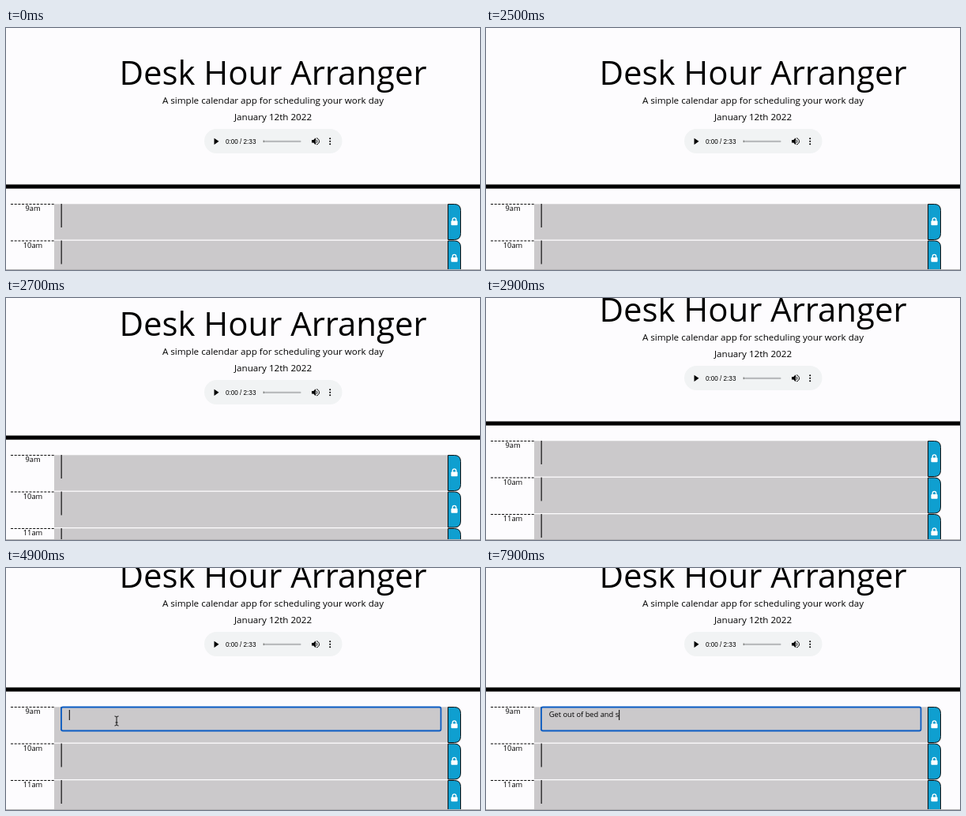
An HTML page for the animation above (8 s loop, 600x307 px).

```html
<!DOCTYPE html>
<html lang="en">
<head>
<meta charset="utf-8">
<title>Desk Hour Arranger</title>
<style>
  html, body { margin: 0; width: 100%; height: 100%; overflow: hidden; background: #fdfcfe; }
  svg { display: block; width: 100vw; height: 100vh; }
  text { font: 9.31px "Open Sans", sans-serif; }
  .mid { text-anchor: middle; }
  .title { font-size: 41.9px; }
  .lead { font-size: 11.64px; }
  .time { font: 8.15px "Liberation Sans", Arial, sans-serif; }
</style>
</head>
<body>
<svg viewBox="0 0 600 307">
  <g id="page">
    <g class="mid">
      <text class="title mid" x="338" y="72">Desk Hour Arranger</text>
      <text class="lead mid" x="338" y="96">A simple calendar app for scheduling your work day</text>
      <text class="lead mid" x="338" y="117">January 12th 2022</text>
    </g>
    <rect x="251" y="128" width="174.5" height="31" rx="15.5" fill="#f1f3f4"/>
    <path d="M263.5 139.7v8.2l6-4.1z"/>
    <text class="time" x="278" y="146.7">0:00 / 2:33</text>
    <rect x="326" y="142.7" width="47.5" height="2.2" rx="1" fill="#b9bbbd"/>
    <rect x="325.6" y="142.5" width="1.2" height="2.6" fill="#777"/>
    <path d="M387 142.1h2.2l2.8-2.8v9l-2.8-2.8H387z"/>
    <path d="M393 141.8q1.7 2 0 4M393 139.7c4.6 1 4.6 7.2 0 8.2" fill="none" stroke="#000"/>
    <path d="M410.2 140.3v0M410.2 143.8v0M410.2 147.3v0" stroke="#000" stroke-width="2.1" stroke-linecap="round"/>
    <rect y="198.5" width="600" height="5.2"/>
    <g id="rows"></g>
    <g id="field">
      <rect x="70" y="223.5" width="480.5" height="30" rx="2" fill="#cbc9cb" stroke="#0b5cc4" stroke-width="1.8"/>
      <text id="note" x="79.8" y="236" xml:space="preserve"></text>
      <rect id="caret" y="227" width="1" height="13"/>
    </g>
  </g>
  <path id="beam" d="M-2.5-6Q0-6 0-4.5Q0-6 2.5-6M0-4.5V4.5M-2.5 6Q0 6 0 4.5Q0 6 2.5 6M-1.5 2h3" fill="none" stroke="#111"/>
  <rect y="306" width="600" height="1" fill="#b4b3b5"/>
</svg>
<script>
const $ = id => document.getElementById(id);
const LOOP = 8000, PHRASE = "Get out of bed and s";
const FOCUS_AT = 4500, TYPE_AT = 5290, KEY_MS = 130;
const scroll = [[2500, 0], [2600, 10], [2700, 24], [2800, 35], [2900, 42], [3000, 45], [3300, 47]];
const mouse = [[3600, 232, 271], [3800, 201, 243], [3900, 201, 243], [4300, 140, 194]];

$("rows").innerHTML = ["9am", "10am", "11am"].map((hour, i) => `
  <g transform="translate(0 ${223 + i * 46.5})">
    <path d="M6 .5H61" stroke="#000" stroke-dasharray="3 1.7"/>
    <text class="mid" x="34" y="9">${hour}</text>
    <rect x="61" y=".3" width="498" height="45.2" fill="#cbc9cb"/>
    <rect x="69.6" width="1.1" height="30"/>
    <path d="M559.5 .5h8q8 0 8 8v29q0 8-8 8h-8z" fill="#0f9fd0" stroke="#111"/>
    <rect x="563.4" y="21.6" width="8.2" height="5.6" rx="1" fill="#fff"/>
    <path d="M565.2 22v-1.8a2.3 2.3 0 0 1 4.6 0V22" fill="none" stroke="#fff" stroke-width="1.3"/>
  </g>`).join("");

// Linear interpolation of column c along keys sorted by time
function along(keys, t, c) {
  const i = keys.findIndex(k => k[0] > t);
  if (i < 0) return keys[keys.length - 1][c];
  if (i === 0) return keys[0][c];
  const a = keys[i - 1], b = keys[i];
  return a[c] + (b[c] - a[c]) * (t - a[0]) / (b[0] - a[0]);
}

function show(el, on) {
  el.style.display = on ? "" : "none";
}

function draw(now) {
  const t = Math.floor(now % LOOP / 100) * 100;
  $("page").setAttribute("transform", `translate(0 ${-along(scroll, t, 1)})`);

  show($("beam"), t >= mouse[0][0] && t < TYPE_AT);
  $("beam").setAttribute("transform", `translate(${along(mouse, t, 1)} ${along(mouse, t, 2)})`);

  show($("field"), t >= FOCUS_AT);
  const typed = Math.max(0, Math.floor((t - TYPE_AT) / KEY_MS) + 1);
  $("note").textContent = PHRASE.slice(0, typed);
  const width = typed ? $("note").getComputedTextLength() : 0;
  $("caret").setAttribute("x", 79.8 + width);
  requestAnimationFrame(draw);
}
requestAnimationFrame(draw);
</script>
</body>
</html>
```
